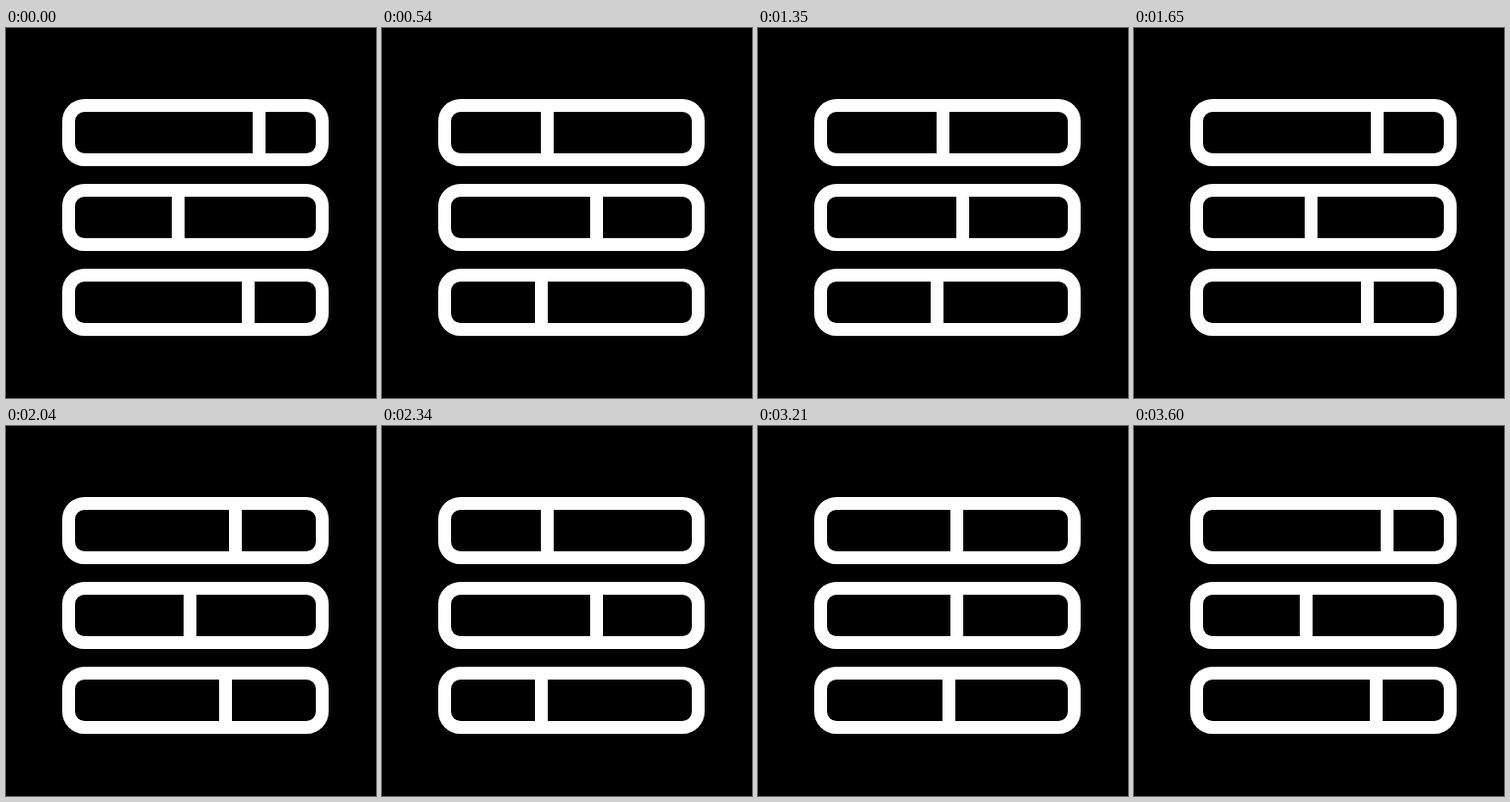
Recreate the animation shown at these times as an HTML page with a canvas. Size 375 by 375 pixels, loop 3.63 s.

```html
<!DOCTYPE html>
<html lang="en">
<head>
<meta charset="utf-8">
<title>Sliders</title>
<style>
  html, body { margin: 0; width: 100%; height: 100%; overflow: hidden; background: #000; }
  canvas { display: block; }
</style>
</head>
<body>
<canvas id="stage" width="375" height="375"></canvas>
<script>
const ctx = document.getElementById('stage').getContext('2d');
const LOOP = 3630, STEP = 30, HALF = 900;
const LINE = 13;

// Each slider's top edge, the divider's start and its travel.
const sliders = [
  { top: 72, start: 249.8, travel: -136.9 },
  { top: 158, start: 168.2, travel: 66 },
  { top: 244, start: 239.09, travel: -129 }
];

const easeInOut = x => x * x * (3 - 2 * x);

function progress(ms) {
  const phase = (ms % (2 * HALF)) / HALF;
  return easeInOut(phase < 1 ? phase : 2 - phase);
}

function drawSlider({ top, start, travel }, p) {
  ctx.beginPath();
  ctx.roundRect(57 + LINE / 2, top + LINE / 2, 270 - LINE, 68 - LINE, 16);
  ctx.stroke();
  ctx.fillRect(Math.round(start + travel * p), top + LINE / 2, LINE, 68 - LINE);
}

function draw(ms) {
  ctx.fillStyle = '#000';
  ctx.fillRect(0, 0, 375, 375);
  ctx.fillStyle = ctx.strokeStyle = '#fff';
  ctx.lineWidth = LINE;
  const p = progress(ms);
  for (const slider of sliders) drawSlider(slider, p);
}

const begin = performance.now();

function tick() {
  const ms = (performance.now() - begin) % LOOP;
  draw(Math.floor(ms / STEP) * STEP);
  requestAnimationFrame(tick);
}
tick();
</script>
</body>
</html>
```
